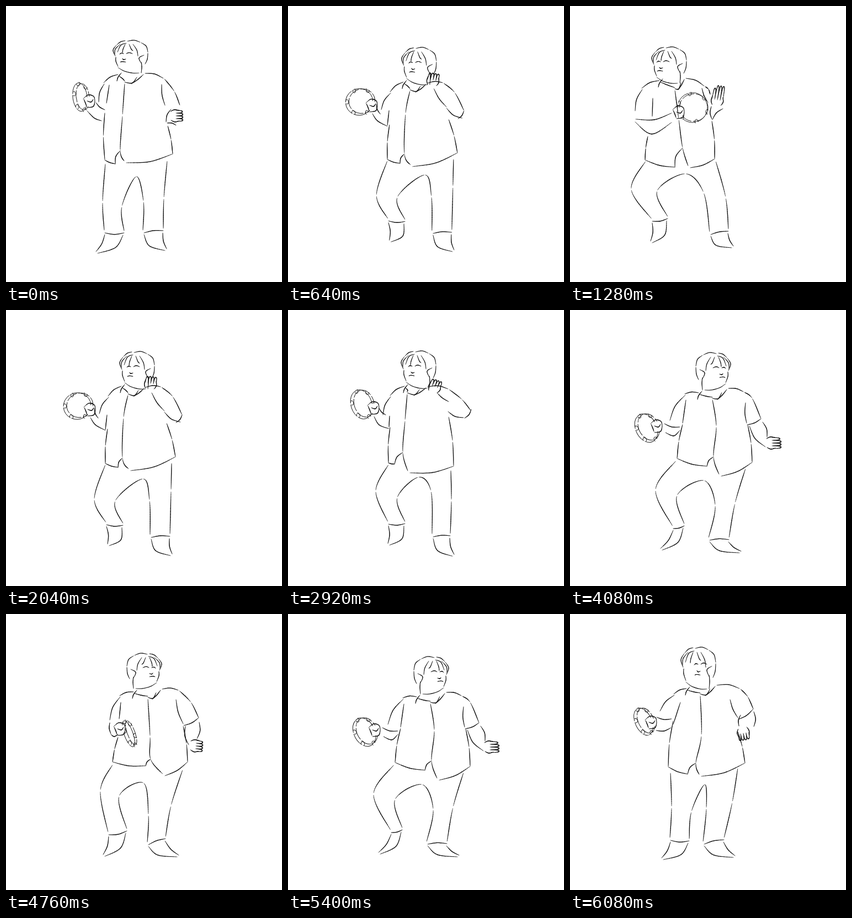
Animation of 500 by 500 pixels, one loop 6160 ms. Source, as an HTML page with a canvas:

```html
<!DOCTYPE html>
<html lang="en">
<head>
<meta charset="utf-8">
<title>Tambourine dance</title>
<style>
html, body { margin: 0; width: 100%; height: 100%; overflow: hidden; background: #fff; }
canvas { display: block; width: 500px; height: 500px; }
</style>
</head>
<body>
<canvas id="stage" width="500" height="500"></canvas>
<script>
const LOOP = 6160, STEP = 40;
const ctx = document.getElementById('stage').getContext('2d');
const lerp = (a, b, k) => a + (b - a) * k;
const mix = (p, q, k) => [lerp(p[0], q[0], k), lerp(p[1], q[1], k)];
const add = ([x, y], dx, dy) => [x + dx, y + dy];
const pairs = a => Array.from({ length: a.length >> 1 }, (_, i) => [a[2 * i], a[2 * i + 1]]);
let weight = 1;

// Each pose is a set of body points:
// head: x, top, facing, feature shift, height   ring: x, y, radii, tilt
// torso: neck and shoulder (left, right), sides (left, right), placket, hem corner
// grip: sleeve, armpit, forearm, hand   free: the same, then aim, spread, cuff
// legs: outer left, inner left to inner right, outer right, toes
const poses = {
  stand: {
    head: [227, 62, 1, 3, .9], ring: [134, 165, 13, 26, -.12],
    torso: [209, 121, 177, 139, 249, 124, 285, 131, 179, 193, 179, 279, 293, 217, 302, 268,
      215, 138, 211, 198, 207, 262, 214, 281, 198, 286],
    grip: [168, 174, 187, 143, 182, 176, 163, 175, 179, 188, 147, 190, 160, 203, 173, 208, 151, 173],
    free: [305, 155, 315, 180, 282, 142, 288, 180, 299, 187, 290, 210, 292, 212, 308, 216, 308, 199, 0, .15, 0],
    legs: [180, 285, 175, 355, 178, 407, 214, 408, 210, 363, 236, 309, 249, 354, 248, 407,
      292, 280, 286, 348, 285, 404, 163, 445, 291, 440]
  },
  hit: {
    head: [181, 74, 1, 0, 1], ring: [222, 184, 27, 27, 0],
    torso: [168, 132, 130, 149, 207, 133, 243, 145, 141, 236, 136, 279, 257, 208, 262, 277,
      190, 150, 197, 205, 204, 257, 214, 290, 190, 292],
    grip: [118, 190, 150, 167, 149, 200, 119, 205, 184, 194, 118, 210, 148, 232, 184, 211, 197, 193],
    free: [251, 151, 254, 160, 239, 149, 250, 175, 256, 182, 257, 205, 258, 206, 277, 186, 267, 170, -1.4, 1, 0],
    legs: [137, 281, 111, 332, 148, 386, 177, 382, 158, 335, 209, 304, 242, 338, 253, 410,
      264, 281, 282, 347, 287, 405, 146, 426, 296, 435]
  },
  listen: {
    head: [239, 75, 1, 4, 1.03], ring: [129, 174, 25, 24, -.3],
    torso: [215, 135, 185, 156, 250, 142, 280, 139, 184, 215, 180, 278, 291, 205, 307, 266,
      221, 152, 213, 195, 211, 268, 222, 288, 203, 285],
    grip: [169, 188, 183, 190, 180, 217, 160, 178, 167, 196, 153, 195, 162, 208, 180, 218, 152, 181],
    free: [302, 157, 319, 190, 264, 150, 287, 183, 287, 185, 316, 203, 319, 190, 308, 204, 262, 133, -1.4, .15, 0],
    legs: [180, 280, 160, 343, 181, 385, 212, 387, 198, 346, 248, 306, 260, 345, 261, 408,
      300, 277, 299, 327, 297, 407, 184, 424, 301, 442]
  },
  pause: {
    head: [238, 74, 1, 4, 1.03], ring: [133, 171, 19, 27, -.3],
    torso: [217, 135, 185, 155, 250, 141, 290, 143, 185, 212, 182, 277, 291, 193, 300, 283,
      216, 150, 212, 200, 208, 258, 217, 292, 193, 279],
    grip: [172, 190, 184, 192, 183, 212, 165, 178, 177, 190, 156, 193, 165, 208, 183, 215, 155, 178],
    free: [315, 162, 331, 182, 270, 150, 291, 166, 290, 184, 318, 195, 332, 180, 320, 196, 266, 139, -1.2, .15, 0],
    legs: [182, 280, 159, 328, 181, 384, 212, 384, 198, 340, 236, 303, 259, 328, 261, 407,
      295, 290, 296, 345, 294, 406, 181, 423, 301, 443]
  },
  swing: {
    head: [258, 77, -1, 0, 1.03], ring: [138, 214, 19, 27, -.45],
    torso: [239, 147, 208, 152, 284, 144, 314, 148, 204, 207, 194, 269, 322, 208, 330, 276,
      258, 160, 265, 211, 260, 266, 270, 298, 248, 283],
    grip: [181, 200, 210, 163, 204, 205, 171, 206, 199, 212, 173, 222, 188, 228, 199, 218, 157, 211],
    free: [330, 160, 346, 197, 318, 168, 320, 205, 325, 210, 354, 248, 349, 203, 357, 230, 366, 241, 0, .4, 1],
    legs: [192, 273, 155, 326, 186, 392, 207, 388, 194, 336, 243, 309, 263, 354, 251, 413,
      318, 287, 299, 350, 288, 413, 164, 432, 310, 437]
  },
  tuck: {
    head: [249, 71, -1, 2, .97], ring: [222, 217, 8, 25, -.35],
    torso: [237, 138, 206, 148, 280, 138, 312, 138, 203, 223, 193, 268, 321, 203, 329, 268,
      257, 151, 261, 222, 262, 263, 284, 290, 253, 275],
    grip: [188, 192, 208, 160, 205, 190, 188, 197, 190, 217, 190, 218, 196, 222, 203, 218, 206, 209],
    free: [335, 160, 349, 188, 308, 155, 321, 199, 325, 203, 331, 237, 350, 196, 346, 226, 344, 239, .1, .15, 1],
    legs: [193, 273, 171, 320, 185, 396, 219, 390, 205, 330, 249, 306, 258, 364, 256, 414,
      320, 282, 299, 347, 289, 404, 176, 436, 313, 437]
  },
  front: {
    head: [234, 60, 1, 15, 1.15], ring: [133, 195, 15, 26, -.42],
    torso: [217, 132, 188, 145, 263, 131, 307, 135, 187, 193, 178, 277, 304, 213, 317, 270,
      236, 145, 238, 220, 228, 270, 234, 291, 213, 290],
    grip: [163, 176, 200, 160, 187, 200, 157, 187, 184, 190, 156, 211, 170, 212, 183, 206, 147, 197],
    free: [322, 150, 332, 172, 290, 155, 304, 188, 309, 183, 306, 203, 333, 177, 333, 204, 314, 216, 1.4, .15, 1],
    legs: [182, 287, 184, 350, 181, 406, 216, 408, 220, 358, 244, 309, 247, 352, 241, 413,
      304, 279, 294, 341, 279, 406, 166, 442, 299, 438]
  }
};

// Arms flung out and body drawn up.
function flingOut({ head, ring, torso, grip, free, legs }) {
  const fling = ([x, y]) => {
    const reach = Math.max(0, Math.abs(x - 235) - 65);
    return [x + Math.sign(x - 235) * reach, y - 10 - reach * .3];
  };
  const move = (a, n) => [...pairs(a.slice(0, n)).flatMap(fling), ...a.slice(n)];
  return { head: [head[0], head[1] - 12, ...head.slice(2)], ring: move(ring, 2),
    torso: move(torso, torso.length), grip: move(grip, grip.length), free: move(free, 18), legs };
}
poses.wide = flingOut(poses.front);

const KEYS = [[0, 'stand'], [700, 'listen'], [1280, 'hit'], [1360, 'hit'], [2040, 'listen'],
  [2920, 'pause'], [3120, 'pause'], [3600, 'wide'], [4080, 'swing'], [4760, 'tuck'],
  [5420, 'swing'], [6080, 'front'], [LOOP, 'front']];

// Catmull-Rom through the points, at position u
function along(pts, u) {
  const i = Math.min(pts.length - 2, Math.floor(u)), t = u - i;
  const at = j => pts[Math.max(0, Math.min(pts.length - 1, j))];
  return [0, 1].map(d => {
    const [a, b, c, e] = [at(i - 1)[d], at(i)[d], at(i + 1)[d], at(i + 2)[d]];
    return b + t / 2 * (c - a + t * (2 * a - 5 * b + 4 * c - e + t * (3 * (b - c) + e - a)));
  });
}

// a brush line, thin at both ends
function brush(pts, from, to) {
  const n = 16;
  let p = along(pts, from);
  for (let i = 1; i <= n; i++) {
    const q = along(pts, lerp(from, to, i / n));
    ctx.lineWidth = weight * (.6 + .75 * Math.sin(Math.PI * (i - .5) / n));
    ctx.beginPath();
    ctx.moveTo(...p);
    ctx.lineTo(...q);
    ctx.stroke();
    p = q;
  }
}
const curve = (...pts) => brush(pts, 0, pts.length - 1);
const chain = (...pts) => pts.slice(1).forEach((_, i) => brush(pts, i + .04, i + .96));
const bow = (p, q, b) => add(mix(p, q, .5), b * (q[1] - p[1]), b * (p[0] - q[0]));
const arc = (p, q, b) => curve(p, bow(p, q, b), q);

const HAIR = ['-27,10 -33,20 -29,32', '-26,9 -19,3 -11,1', '-7,2 5,0 16,4', '18,5 27,12 30,24',
  '30,26 29,38 25,48', '23,30 14,36 19,48', '-9,6 -19,10 -25,24', '-20,8 -29,18 -30,29',
  '-11,8 -15,18 -16,25', '-4,8 0,18 3,21', '3,8 10,20 12,32'];
const FACE = ['-24,28 -21,26 -17,27', '-12,27 -7,25 -1,27', '-19,37 -17,39 -13,38', '-23,44 -19,43 -13,44'];
const JAW = ['-28,34 -28,42 -24,53', '-24,55 -13,62 2,66 14,66', '18,44 19,54 18,66'];
const HAND = ['-11,-5 -2,-12 8,-9 10,0', '10,0 7,9 -4,11', '-10,-4 -7,3 -5,9', '-4,-1 3,1 7,-4'];
const sketch = (strokes, place) => strokes.forEach(s =>
  curve(...s.split(' ').map(p => place(p.split(',').map(Number)))));

function drawHead([x, top, facing, shift, tall]) {
  const place = dx => ([px, py]) => [x + facing * (px + dx), top + py * tall];
  sketch(HAIR, place(0));
  sketch(JAW, place(0));
  sketch(FACE, place(shift));
}

function drawTorso([neckL, shL, neckR, shR, sideL, hemL, sideR, hemR, top, mid, flap, end, corner]) {
  curve(neckL, add(neckL, -6, 8), add(neckL, -8, 15));
  curve(add(neckL, -4, 6), add(mix(neckL, top, .4), 0, 4), add(top, 0, -2));
  curve(top, add(mix(top, neckR, .4), 0, 7), mix(top, neckR, .65));
  curve(add(mix(top, neckR, .35), 0, 8), add(mix(top, neckR, .7), 0, 5), neckR);
  arc(add(neckL, -6, 3), shL, -.1);
  arc(add(neckR, 3, -2), shR, .1);
  chain(add(top, 0, 2), mid, flap, end);
  arc(flap, corner, -.15);
  chain(sideL, bow(sideL, hemL, -.03), hemL);
  chain(sideR, bow(sideR, hemR, .03), hemR);
  arc(hemL, corner, -.06);
  arc(add(end, 4, 3), hemR, -.07);
}

function drawGrip([sleeve, pit, pitEnd, top, topEnd, low, lowMid, lowEnd, hand], shoulder) {
  arc(add(shoulder, 1, 2), sleeve, -.1);
  arc(pit, pitEnd, 0);
  arc(top, topEnd, -.1);
  curve(low, lowMid, lowEnd);
  sketch(HAND, p => add(hand, ...p));
}

function drawFree(points, aim, spread, cuff, shoulder) {
  const [elbow, sleeve, pit, pitEnd, inner, innerEnd, outer, outerEnd, hand] = points;
  chain(add(shoulder, 2, 1), elbow, sleeve);
  arc(pit, pitEnd, -.06);
  arc(inner, innerEnd, -.12);
  arc(outer, outerEnd, .12);
  if (cuff > .5) arc(add(pitEnd, 1, 3), sleeve, -.08);
  const c = Math.cos(aim), s = Math.sin(aim);
  const at = (u, v) => add(hand, u * c - v * s, u * s + v * c);
  curve(at(-10, -8), at(-3, -11), at(6, -10));
  curve(at(-9, 8), at(-2, 11), at(6, 9));
  for (let i = 0; i < 4; i++) {
    const v = -10 + 5 * i, tip = 9 + spread * (i === 0 ? 9 : 14);
    curve(at(0, v), at(tip, v + 1), at(tip, v + 4), at(2, v + 5));
  }
}

function drawFoot(outer, inner, toe, side) {
  arc(add(outer, side, 7), toe, side * .08);
  curve(add(toe, 3 * side, 3), add(mix(toe, inner, .5), 10 * side, 11), add(inner, -2 * side, 7));
}

function drawLegs([hipL, kneeL, ankleL, footL, innerL, crotch, innerR, footR, hipR, kneeR, ankleR, toeL, toeR]) {
  chain(hipL, kneeL, ankleL);
  chain(footL, innerL, crotch, innerR, footR);
  chain(hipR, kneeR, ankleR);
  arc(add(ankleL, 1, 4), add(footL, 0, 3), -.08);
  arc(add(footR, 2, 4), add(ankleR, 0, 3), .06);
  drawFoot(ankleL, footL, toeL, 1);
  drawFoot(ankleR, footR, toeR, -1);
}

function drawRing([x, y, rx, ry, tilt]) {
  const depth = rx > 26 ? 2 : 5;
  ctx.save();
  ctx.translate(x, y);
  ctx.rotate(tilt);
  ctx.lineWidth = .9;
  const rim = (cx, cy, a, b, from, to) => {
    ctx.beginPath();
    ctx.ellipse(cx, cy, a, b, 0, from, to);
    ctx.stroke();
  };
  for (let i = 0; i < 6; i++) {
    const a = i * Math.PI / 3 + .3;
    rim(0, 0, rx, ry, a, a + .93);
    rim(depth, 0, rx - 1, ry - 2, a + .4, a + 1.3);
    rim(Math.cos(a) * rx + depth / 2, Math.sin(a) * (ry - 1), 3, 4, a + 1, a + 5);
  }
  ctx.restore();
}

function draw(now) {
  const t = Math.floor(now % LOOP / STEP) * STEP;
  const n = KEYS.findIndex(k => k[0] > t), [t0, from] = KEYS[n - 1], [t1, to] = KEYS[n];
  const k = (1 - Math.cos(Math.PI * (t - t0) / (t1 - t0))) / 2;
  const part = name => poses[from][name].map((v, i) => lerp(v, poses[to][name][i], k));
  const torso = pairs(part('torso')), grip = pairs(part('grip')), free = part('free');

  ctx.fillStyle = '#fff';
  ctx.fillRect(0, 0, 500, 500);
  ctx.strokeStyle = '#111';
  ctx.lineCap = 'round';
  drawRing(part('ring'));

  // the gripping hand hides the rim behind it
  ctx.beginPath();
  ctx.arc(...grip[8], 9, 0, 7);
  ctx.fill();

  weight = .85;
  drawHead(part('head'));
  weight = 1;
  drawTorso(torso);
  drawGrip(grip, torso[1]);
  drawFree(pairs(free.slice(0, 18)), ...free.slice(18), torso[3]);
  drawLegs(pairs(part('legs')));
}

const start = performance.now();
(function frame() {
  draw(performance.now() - start);
  requestAnimationFrame(frame);
})();
</script>
</body>
</html>
```
